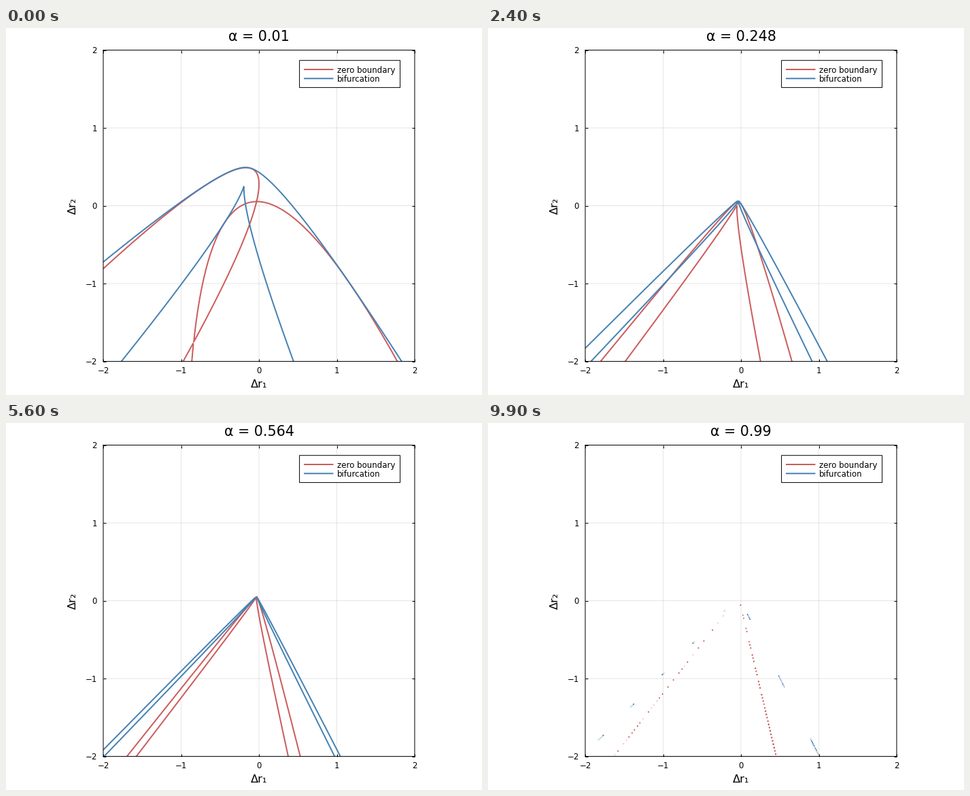
These frames come from a looping animation (700 by 540 pixels, 10 s). A matplotlib script:

```python
import numpy as np
import matplotlib.pyplot as plt
from matplotlib.animation import FuncAnimation

plt.rcParams.update({"font.family": "DejaVu Sans", "path.snap": False,
                     "path.simplify": False})

W, H = 700, 540
FRAMES = 100
PX = 0.72  # points per pixel at 100 dpi
LEFT, RIGHT, TOP, BOTTOM = 143, 601, 32.55, 490.55
RED, BLUE = "indianred", "steelblue"

# r = P + (1 - alpha) (A1 s + A2 t) + alpha (B1 s^2 + B12 s t + B2 t^2)
P = np.array([-0.0309, 0.0537])
A1 = np.array([0.0315, 0.1335])
A2 = np.array([-0.0928, -0.001])
B1 = np.array([-0.7805, -1.0])
B2 = np.array([0.2356, -1.0])
B12 = np.array([1.10860, 0.14025])

axis = np.linspace(-2, 2, 400)
X, Y = np.meshgrid(axis, axis)
ZX, ZY = P[0] - X, P[1] - Y


def cross(u, v):
    return u[0] * v[1] - u[1] * v[0]


def resultant(a, b):
    """Vanishes where r lies on the image of one coordinate axis."""
    z = (ZX, ZY)
    return cross(b, z) ** 2 - cross(b, a) * cross(a, z)


def zero_boundary(k):
    return resultant(k * A1, B1) * resultant(k * A2, B2)


def bifurcation(k):
    """Discriminant of the pencil spanned by the two isocline conics."""
    a1, a2, b1, b2, b12 = (np.poly1d(v[::-1]) for v in
                           (k * A1 / 2, k * A2 / 2, B1, B2, B12))
    e2, e1, e0 = (b1 * b2 - b12 * b12 / 4).coeffs
    f3, f2, f1, f0 = (b1 * a2 * a2 + b2 * a1 * a1 - b12 * a1 * a2).coeffs
    a = ZY * e2 - f3
    b = ZY * e1 + ZX * e2 - f2
    c = ZY * e0 + ZX * e1 - f1
    d = ZX * e0 - f0
    return (18 * a * b * c * d - 4 * b**3 * d + b * b * c * c
            - 4 * a * c**3 - 27 * a * a * d * d)


fig = plt.figure(figsize=(W / 100, H / 100), dpi=100, facecolor="white")
ax = fig.add_axes([LEFT / W, 1 - BOTTOM / H,
                   (RIGHT - LEFT) / W, (BOTTOM - TOP) / H])


def label(x, y, text, size, ha="center", va="baseline", **kw):
    return fig.text(x / W, 1 - y / H, text, fontsize=size * PX, ha=ha,
                    va=va, zorder=6, **kw)


def stroke(xs, ys, color, width):
    fig.add_artist(plt.Line2D(np.array(xs) / W, 1 - np.array(ys) / H,
                              color=color, lw=width * PX, zorder=5,
                              solid_capstyle="butt"))


ticks = [-2, -1, 0, 1, 2]
ax.set(xlim=(-2, 2), ylim=(-2, 2), xticks=ticks, yticks=ticks)
ax.set_axisbelow(True)
ax.grid(color="black", alpha=0.1, lw=PX)
ax.tick_params(direction="in", length=4 * PX, width=PX, top=True, right=True,
               labelbottom=False, labelleft=False)
for spine in ax.spines.values():
    spine.set_linewidth(PX)

for v in ticks:
    name = str(v).replace("-", "\u2212")
    f = (v + 2) / 4
    label(LEFT + f * (RIGHT - LEFT), 507.7, name, 11.8)
    label(133.7, BOTTOM - f * (BOTTOM - TOP) + 4.6, name, 11.8, ha="right")
label(372, 529, "Δr₁", 16.2)
label(105.6, 262, "Δr₂", 16.2, ha="right", va="center", rotation=90)
title = label(372, 18.6, "", 20.7)

fig.add_artist(plt.Rectangle((431.6 / W, 1 - 87.6 / H), 148 / W, 39.9 / H,
                             fc="white", ec="black", lw=PX, zorder=4))
for y, color, name in [(61, RED, "zero boundary"), (74.3, BLUE, "bifurcation")]:
    stroke([438, 481.5], [y, y], color, 2)
    label(487.2, y + 4.8, name, 11.8, ha="left")

curves = []


def update(i):
    while curves:
        curves.pop().remove()
    alpha = 0.01 + 0.98 * i / (FRAMES - 1)
    k = (1 - alpha) / np.sqrt(alpha)
    title.set_text(f"α = {round(alpha, 3)}")
    for field, color in [(zero_boundary, RED), (bifurcation, BLUE)]:
        cs = ax.contour(X, Y, field(k), levels=[0], colors=[color],
                        linewidths=2 * PX, zorder=2)
        cs.set_joinstyle("round")
        cs.set_capstyle("round")
        curves.append(cs)


anim = FuncAnimation(fig, update, frames=FRAMES, interval=100, repeat=True)
plt.show()
```
